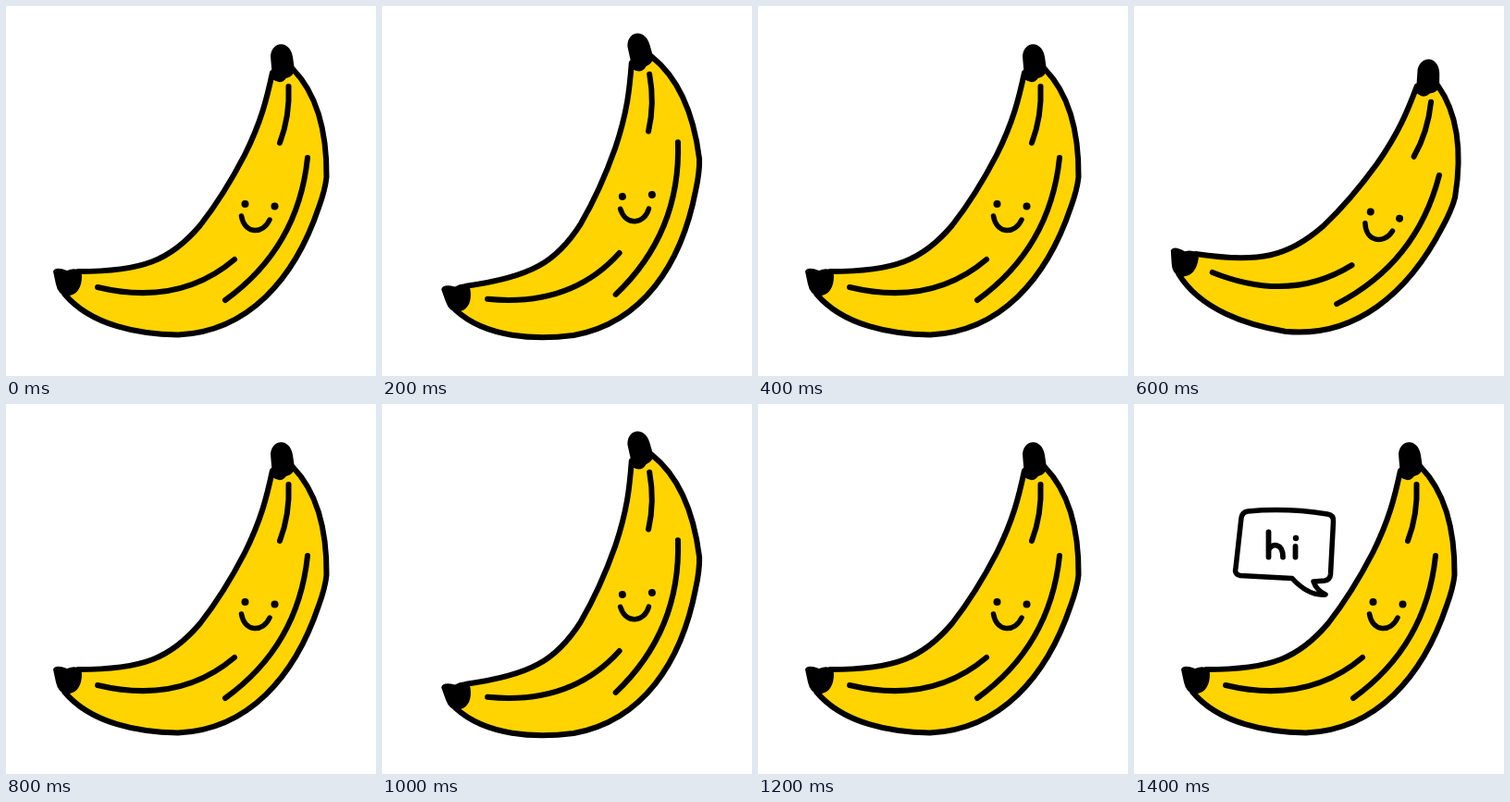
An HTML page with a canvas that plays this animation: 400x400 px, repeating every 2.4 s.

```html
<!DOCTYPE html>
<html lang="en">
<head>
<meta charset="utf-8">
<title>Banana says hi</title>
<style>
html, body { margin: 0; width: 100%; height: 100%; overflow: hidden; background: #fff; }
canvas { display: block; width: 400px; height: 400px; }
</style>
</head>
<body>
<canvas id="stage" role="img" aria-label="A smiling banana sways and says hi"></canvas>
<script>
const SIZE = 400, MID = SIZE / 2, LOOP = 2400, BEAT = 200;
const INK = '#000', YELLOW = '#ffd400';
const LEFT = -7.8, RIGHT = 8.5;
const SWAY = [0, LEFT, 0, RIGHT, 0, LEFT, 0]; // degrees, one per beat

const canvas = document.getElementById('stage');
const ctx = canvas.getContext('2d');
const dpr = window.devicePixelRatio || 1;
canvas.width = canvas.height = SIZE * dpr;

const shape = d => new Path2D(d);
const body = shape(
  'M288 72 C282 100 276 125 258 161 C243 190 228 214 210 237 C178 275 148 287 78 287 ' +
  'L63 311 C92 346 145 355 186 355.5 C262 352 312 295 338 218 ' +
  'Q345 199 346.5 185 C347 140 339 98 310 68 Z');
const topTip = shape('M286 54 C288 37 307 37 310 55 L312 69 Q311 76 303 78 Q297 86 288 79 Z');
const lowTip = shape('M51 287 Q53 281 66 286 Q79 281 82 291 Q82 310 69 313 Q57 315 54 301 Z');
const ridges = shape('M305.5 87 Q307 119 296 148 M326 164 Q316 261 237 318 M99 304 Q187 325 247 274');
const smile = shape('M254.5 227 C258 247 278 247 285 231');
const bubble = shape(
  'M123 116 Q165 112 209 119 Q216 120 215.5 127 L212.5 184 Q212 190 206 191 L194 192 ' +
  'Q197 201 207 206 Q189 208 171 188.5 L115 185.5 Q108 184 110 177 L116 123 Q117 117 123 116 Z');
const letters = shape('M145.5 138.5 V165.5 M145.5 158 C149 150 161 150 161 165.5 M174.5 154 V165.5');

function stroke(path, width) {
  ctx.lineWidth = width;
  ctx.stroke(path);
}

function fill(path, color) {
  ctx.fillStyle = color;
  ctx.fill(path);
}

function dot(x, y, r) {
  const path = new Path2D();
  path.arc(x, y, r, 0, Math.PI * 2);
  fill(path, INK);
}

function drawBanana(deg) {
  ctx.save();
  ctx.translate(MID, MID);
  ctx.rotate(deg * Math.PI / 180);
  ctx.translate(-MID, -MID);
  fill(body, YELLOW);
  stroke(body, 6);
  fill(topTip, INK);
  fill(lowTip, INK);
  stroke(ridges, 6);
  stroke(smile, 5.5);
  dot(258.5, 214, 4);
  dot(290.5, 216.5, 4);
  ctx.restore();
}

function drawBubble() {
  fill(bubble, '#fff');
  stroke(bubble, 5.5);
  stroke(letters, 5.8);
  dot(175, 145, 3.2);
}

function draw(time) {
  const beat = Math.floor((time % LOOP) / BEAT);
  ctx.setTransform(dpr, 0, 0, dpr, 0, 0);
  ctx.fillStyle = '#fff';
  ctx.fillRect(0, 0, SIZE, SIZE);
  ctx.strokeStyle = INK;
  ctx.lineCap = ctx.lineJoin = 'round';
  drawBanana(SWAY[beat] || 0);
  if (beat >= SWAY.length) drawBubble();
}

const start = performance.now();
function tick() {
  draw(performance.now() - start);
  requestAnimationFrame(tick);
}
tick();
</script>
</body>
</html>
```
